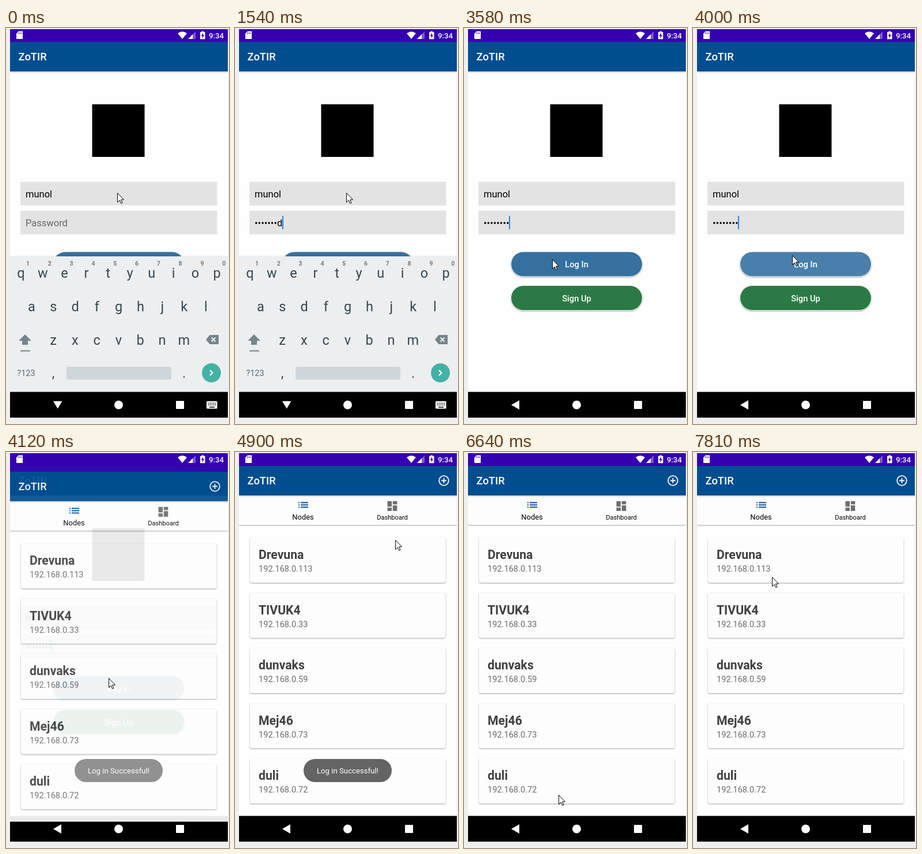
Write an HTML page that moves like this. It is 387 px wide and 685 px high and loops after 8000 ms.

```html
<!DOCTYPE html>
<html lang="en">
<head>
<meta charset="utf-8">
<title>Login demo</title>
<style>
html, body { margin: 0; width: 100%; height: 100%; overflow: hidden; background: #efefef; }
svg { display: block; width: 387px; height: 685px; font-family: Roboto, "Open Sans", sans-serif; }
.title { font-size: 18.4px; font-weight: 500; fill: #fff; }
.field { font-size: 16.5px; }
.button { font-size: 14.7px; font-weight: 500; fill: #fff; text-anchor: middle; }
.raised { filter: drop-shadow(0 1.5px 1.2px rgba(0, 0, 0, .36)); }
.bar { filter: drop-shadow(0 1px 1.5px rgba(0, 0, 0, .35)); }
.name { font-size: 21.2px; font-weight: 700; fill: #404040; }
.ip { font-size: 14.6px; fill: #6c6c6c; }
#keys text { text-anchor: middle; fill: #37474f; font-size: 23.5px; }
#keys .digit { font-size: 10.5px; font-weight: 700; fill: #727d82; }
#keys .mode { font-size: 14.5px; fill: #5c6a71; }
</style>
</head>
<body>
<svg viewBox="0 0 387 685">
  <defs>
    <clipPath id="phone"><rect x="7" y="2" width="378" height="672"/></clipPath>
    <clipPath id="page"><rect x="7" y="24" width="378" height="606"/></clipPath>
  </defs>

  <g clip-path="url(#phone)">
    <!-- Login screen -->
    <rect x="7" y="2" width="378" height="672" fill="#fefefe"/>
    <rect class="bar" x="7" y="24" width="378" height="51" fill="#004d90"/>
    <rect x="7" y="2" width="378" height="22" fill="#3500b0"/>
    <text class="title" x="21.5" y="56">ZoTIR</text>
    <rect x="149.5" y="132" width="91" height="91"/>
    <g fill="#e3e3e3">
      <rect x="25" y="266" width="341.5" height="41"/>
      <rect x="25" y="316" width="341.5" height="41"/>
    </g>
    <text class="field" x="34" y="293">munol</text>
    <text class="field" id="secret" x="34" y="343"></text>
    <rect id="caret" y="325" width="2" height="23" fill="#1e88e5"/>
    <g class="raised" stroke="#fdfdfd">
      <rect id="login" x="81.5" y="387" width="228" height="43" rx="21.5" fill="#36709f"/>
      <rect x="81.5" y="445.5" width="228" height="43" rx="21.5" fill="#2b7a45"/>
    </g>
    <text class="button" x="195.5" y="414">Log In</text>
    <text class="button" x="195.5" y="473">Sign Up</text>
    <g clip-path="url(#page)">
      <g id="keys">
        <rect class="bar" x="7" y="395" width="378" height="236" fill="#eceef0"/>
        <path d="M33 530L44 541H38V548H28V541H22ZM25 557.5H42V559.5H25Z" fill="#75838b"/>
        <path d="M347 539L353.5 531H369V547H353.5Z" fill="#75838b"/>
        <path d="M356.5 535.5L363.5 542.5M363.5 535.5L356.5 542.5" stroke="#eceef0" stroke-width="2"/>
        <text class="mode" x="35" y="602">?123</text>
        <text x="82" y="605">,</text>
        <rect x="105" y="586" width="182" height="22" rx="3" fill="#cfd6d9"/>
        <text x="309" y="605">.</text>
        <circle cx="356.5" cy="596.5" r="16.5" fill="#45b1a5"/>
        <path d="M354 592L358.5 596.5L354 601" fill="none" stroke="#fff" stroke-width="2"/>
      </g>
    </g>
    <rect x="7" y="629.5" width="378" height="44.5"/>

    <!-- Node list screen -->
    <g id="home">
      <rect x="7" y="2" width="378" height="22" fill="#3500b0"/>
      <rect x="7" y="75" width="378" height="555" fill="#fefefe"/>
      <rect class="raised" x="7" y="75" width="378" height="51" fill="#fdfdfd"/>
      <rect class="bar" x="7" y="24" width="378" height="51" fill="#004d90"/>
      <text class="title" x="21.5" y="56">ZoTIR</text>
      <g fill="none" stroke="#fff" stroke-width="1.8">
        <circle cx="362.5" cy="49.5" r="8.3"/>
        <path d="M358 49.5H367M362.5 45V54"/>
      </g>
      <path d="M110 87.5H112M114 87.5H127M110 91.5H112M114 91.5H127M110 95.5H112M114 95.5H127" stroke="#0b5096" stroke-width="1.9"/>
      <path d="M264.5 85H272V94.5H264.5ZM273.8 85H281.3V90.5H273.8ZM264.5 96.3H272V102H264.5ZM273.8 92.3H281.3V102H273.8Z" fill="#6e6e6e"/>
      <text x="118" y="117" text-anchor="middle" font-size="12.9">Nodes</text>
      <text x="273" y="117" text-anchor="middle" font-size="11.1">Dashboard</text>
      <g id="cards"></g>
      <rect x="7" y="629.5" width="378" height="44.5"/>
    </g>

    <!-- System bars -->
    <g fill="#fff">
      <path d="M22 5.5H29V19H18V9.5Z"/>
      <path d="M21.5 7.5V10.5M24 7.5V10.5M26.5 7.5V10.5" stroke="#3500b0"/>
      <path d="M298 9.3Q306 3.3 314 9.3L306 19Z"/>
      <path d="M329 6V19H316Z" opacity=".35"/>
      <path d="M324 11V19H316Z"/>
      <path d="M337 7H339.5V5.5H343V7H345.5V19.3H337Z"/>
      <path d="M342 8.5L338.5 13.8H340.8V17.8L344 12.3H342Z" fill="#3500b0"/>
      <text x="378" y="18" text-anchor="end" font-size="13.2" font-weight="500">9:34</text>
      <path id="back"/>
      <circle cx="195.5" cy="652" r="7.5"/>
      <rect x="295" y="645" width="14" height="14" rx="1"/>
      <g id="switcher">
        <rect x="348" y="645.5" width="18.5" height="13" rx="1.5"/>
        <path d="M350.5 649H364.5M350.5 652H364.5" stroke="#000" stroke-width="1.7" stroke-dasharray="1.7 1.3"/>
        <path d="M353 655.8H362" stroke="#000" stroke-width="1.5"/>
      </g>
    </g>

    <g id="toast">
      <rect x="119" y="531" width="153" height="40" rx="20" fill="#646464"/>
      <text x="195.5" y="556" text-anchor="middle" font-size="13.2" fill="#fff">Log in Successful!</text>
    </g>
  </g>

  <path id="mouse" d="M.5 .5V16.5L4.2 13L6.7 18.5L9 17.5L6.6 12H11.5Z" fill="#fff" stroke="#000"/>
</svg>

<script>
const LOOP = 8000;
const $ = id => document.getElementById(id);
const secret = $('secret'), caret = $('caret'), login = $('login'), keys = $('keys'),
  home = $('home'), back = $('back'), switcher = $('switcher'), toast = $('toast'), mouse = $('mouse');

function addText(parent, x, y, text, cls = '') {
  const el = document.createElementNS('http://www.w3.org/2000/svg', 'text');
  el.setAttribute('x', x);
  el.setAttribute('y', y);
  el.setAttribute('class', cls);
  el.textContent = text;
  parent.append(el);
}

const PITCH = 37.8;
[['qwertyuiop', 26, 432], ['asdfghjkl', 44.5, 490], ['zxcvbnm', 82, 548]].forEach(([row, x, y]) =>
  [...row].forEach((key, i) => addText(keys, x + i * PITCH, y, key)));
[...'1234567890'].forEach((digit, i) => addText(keys, 38 + i * PITCH, 411, digit, 'digit'));

const nodes = [['Drevuna', 113], ['TIVUK4', 33], ['dunvaks', 59], ['Mej46', 73], ['duli', 72]];
nodes.forEach(([name, host], i) => {
  const y = 148 + i * 95.5;
  $('cards').insertAdjacentHTML('beforeend',
    `<rect class="raised" x="26" y="${y}" width="339.5" height="78" rx="3" fill="#fdfdfd"/>`);
  addText($('cards'), 41, y + 37, name, 'name');
  addText($('cards'), 41, y + 59, '192.168.0.' + host, 'ip');
});

// The screen refreshes in bursts: start, end, number of refreshes
const bursts = [[1090, 1540, 4], [2500, 3460, 8], [4000, 5020, 9],
  [5170, 6100, 8], [6220, 7150, 8], [7270, 7810, 5]];
const ticks = [0, 250, 530, 810, 2100, 3580];
for (const [from, to, n] of bursts)
  for (let i = 0; i < n; i++)
    ticks.push(Math.floor((from + (to - from) * i / (n - 1)) / 10) * 10);
ticks.sort((a, b) => a - b);

// Pointer waypoints: time, x, y
const route = [
  [0, 193, 285], [1540, 193, 285], [2100, 165, 327], [2500, 108, 520],
  [2630, 84, 640], [2910, 84, 646], [3180, 112, 520], [3460, 153, 400],
  [3580, 153, 400], [4120, 178, 391], [4890, 278, 152], [5020, 298, 167],
  [5170, 300, 185], [6100, 205, 480], [6480, 170, 618], [6610, 164, 593],
  [6750, 160, 560], [7150, 221, 311], [7810, 137, 216]
];

function pointer(t) {
  const i = route.findIndex(p => p[0] > t);
  if (i < 0) return route[route.length - 1].slice(1);
  const [a, b] = [route[i - 1], route[i]];
  const k = (t - a[0]) / (b[0] - a[0]);
  return [1, 2].map(j => Math.round(a[j] + (b[j] - a[j]) * k));
}

const typed = [[250, 1], [530, 3], [810, 4], [1090, 5], [1240, 6], [1390, 7], [1540, 8]];
const show = (el, on) => el.setAttribute('visibility', on ? 'visible' : 'hidden');
const move = (el, x, y) => el.setAttribute('transform', `translate(${x} ${y})`);

function drawSecret(t) {
  const n = typed.reduce((count, [at, size]) => t >= at ? size : count, 0);
  const last = t < 2500 ? 'password'[n - 1] : '•';
  const text = n ? '•'.repeat(n - 1) + last : 'Password';
  if (secret.textContent !== text) secret.textContent = text;
  secret.setAttribute('fill', n ? '#000' : '#666');
  caret.setAttribute('x', Math.floor(34 + secret.getComputedTextLength()));
  show(caret, n && (t < 2100 || t >= 2500 && t < 3040 || t >= 3580));
}

function draw(time) {
  const t = time % LOOP;
  const tick = ticks.filter(v => v <= t).pop();
  drawSecret(t);
  move(mouse, ...pointer(tick));

  const typing = tick < 2770;
  move(keys, 0, tick < 2910 ? 0 : tick < 3040 ? 90 : 240);
  back.setAttribute('d', typing ? 'M82 645.5H97.5L89.7 658.5Z' : 'M96 644V660L82 652Z');
  show(switcher, typing);

  login.setAttribute('fill', tick >= 4000 ? '#4a7fab' : '#36709f');
  const entering = tick < 4250;
  show(home, tick >= 4120);
  home.setAttribute('opacity', entering ? .92 : 1);
  move(home, 0, entering ? 10 : 0);

  show(toast, tick >= 4120 && tick < 6100);
  toast.setAttribute('opacity', entering ? .7 : tick < 5960 ? 1 : .5);
}

const start = performance.now();
function frame() {
  draw(performance.now() - start);
  requestAnimationFrame(frame);
}
frame();
</script>
</body>
</html>
```
